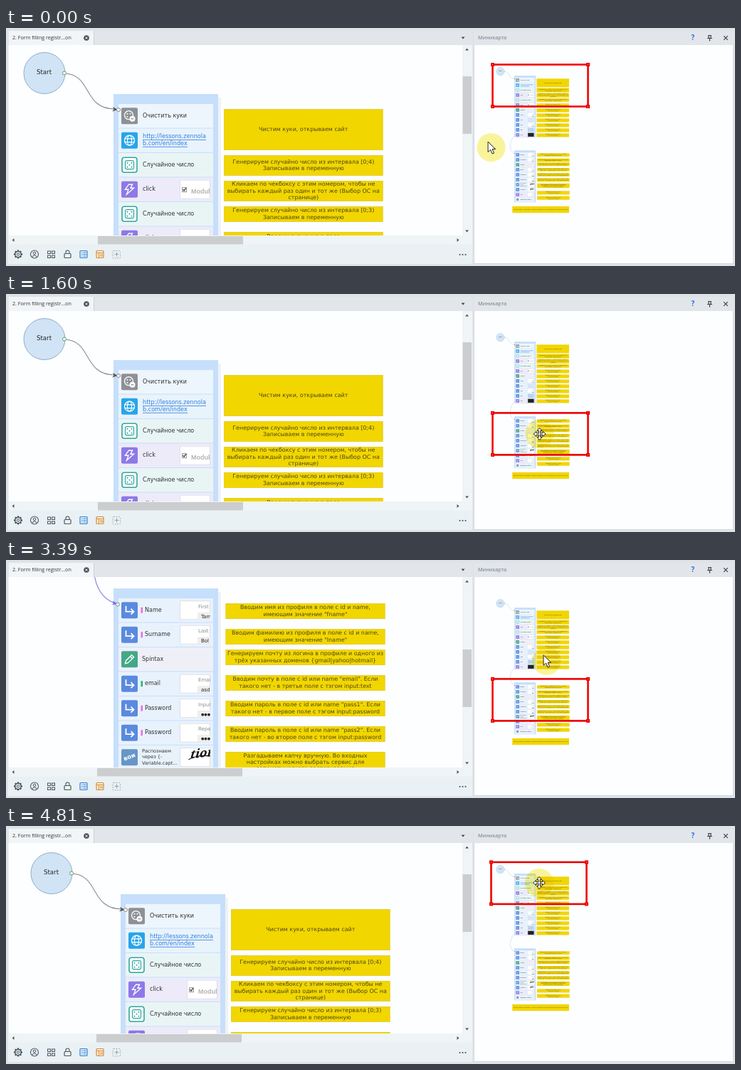
An HTML page with a canvas that plays this animation: 1024 px wide and 335 px high, repeating every 6660 ms.

```html
<!DOCTYPE html>
<html lang="ru">
<head>
<meta charset="utf-8">
<title>Миникарта</title>
<style>
html, body { margin: 0; width: 100%; height: 100%; overflow: hidden; background: #dfe3e8; }
canvas { display: block; width: 1024px; height: 335px; }
</style>
</head>
<body>
<canvas id="stage" width="1024" height="335"></canvas>
<script>
const g = document.getElementById('stage').getContext('2d');
const LOOP = 6660, PITCH = 34.5, MAP = 0.203;
const BODY = '"DejaVu Sans", sans-serif', UI = '"Open Sans", "Noto Sans", sans-serif';

function rect(x, y, w, h, fill, stroke) {
  if (fill) { g.fillStyle = fill; g.fillRect(x, y, w, h); }
  if (stroke) { g.strokeStyle = stroke; g.lineWidth = 1; g.strokeRect(x + .5, y + .5, w - 1, h - 1); }
}
function round(x, y, w, h, r, fill, stroke, lw = 1) {
  g.beginPath(); g.roundRect(x, y, w, h, r); paint(fill, stroke, lw);
}
function disc(x, y, r, fill, stroke, lw = 1) {
  g.beginPath(); g.arc(x, y, r, 0, 7); paint(fill, stroke, lw);
}
function shape(d, fill, stroke, lw = 1) {
  const p = new Path2D(d);
  if (fill) { g.fillStyle = fill; g.fill(p); }
  if (stroke) { g.strokeStyle = stroke; g.lineWidth = lw; g.stroke(p); }
}
function paint(fill, stroke, lw) {
  if (fill) { g.fillStyle = fill; g.fill(); }
  if (stroke) { g.strokeStyle = stroke; g.lineWidth = lw; g.stroke(); }
}
function text(s, x, y, size, color, align = 'left', font = BODY, weight = '') {
  g.font = `${weight} ${size}px ${font}`;
  g.fillStyle = color; g.textAlign = align; g.textBaseline = 'middle';
  g.fillText(s, x, y);
}
function at(x, y, draw, k = 1) {
  g.save(); g.translate(x, y); g.scale(k, k); draw(); g.restore();
}
function clipped(x, y, w, h, draw) {
  g.save(); g.beginPath(); g.rect(x, y, w, h); g.clip(); draw(); g.restore();
}

// Row kinds: icon colour, row background, glyph centred on 0,0.
const KINDS = {
  cookie: ['#8d9196', '#edf5fd', () => {
    disc(-1, -1, 6, null, '#fff', 1.3);
    for (const [x, y] of [[-3, -3], [1, -3], [-3, 1]]) disc(x, y, 1, '#fff');
    disc(4, 4, 4, '#fff'); rect(2, 3.4, 4, 1.3, '#8d9196');
  }],
  globe: ['#27a5ea', '#e8f3fc', () => {
    disc(0, 0, 7, null, '#fff', 1.3);
    g.beginPath(); g.ellipse(0, 0, 3, 7, 0, 0, 7); paint(null, '#fff', 1.2);
    shape('M-7 -2.4H7M-7 2.4H7', null, '#fff', 1.2);
  }],
  dice: ['#fff', '#e9f5f5', () => {
    round(-10.5, -10.5, 21, 21, 3, '#fff', '#2fa59d', 1.6);
    round(-6, -6, 12, 12, 2, null, '#2fa59d', 1.2);
    for (const [x, y] of [[-3, -3], [3, -3], [0, 0], [-3, 3], [3, 3]]) disc(x, y, 1, '#2fa59d');
  }],
  click: ['#8d79e7', '#edebf9', () => shape('M-1 -7H4L1.500 -2H6L-4 7L-1.500 0H-6Z', null, '#fff', 1.4)],
  input: ['#5a8ade', '#e8f2fd', () => shape('M-5 -6V2H5M2 -2L6 2L2 6', null, '#fff', 1.8)],
  pen: ['#43a887', '#efeff8', () => shape('M-6 6L-5 2L3 -6L6 -3L-2 5ZM1 -4L4 -1', null, '#fff', 1.4)],
  captcha: ['#6696c6', '#e8f2fb', () => {
    g.rotate(-.35); text('вои', 0, 0, 8.500, '#fff', 'center', BODY, 'bold');
  }],
  gear: ['#e9f1fb', '#e8f2fd', () => { disc(0, 0, 7, '#4c6d95'); disc(0, 0, 3, '#e9f1fb'); }]
};

const FIELD = (a, b) => ({ a, b });
const ROWS1 = [
  ['cookie', 'Очистить куки'], ['globe', ''], ['dice', 'Случайное число'],
  ['click', 'click', { check: 1 }], ['dice', 'Случайное число'], ['click', 'click', { check: 1 }],
  ['pen', 'Spintax'], ['input', 'Login', FIELD('Login', 'abc')], ['input', 'Text', { tint: '#d5e6f8' }],
  ['input', 'Text', FIELD('Text', 'abc')], ['input', 'Text', { tint: '#b9d3ee' }],
  ['click', 'click', { tint: '#222' }]
];
const PINK = '#f169dc', GREEN = '#1fb876';
const ROWS2 = [
  ['input', 'Name', FIELD('First', 'Tam'), PINK], ['input', 'Surname', FIELD('Last', 'Bol'), PINK],
  ['pen', 'Spintax'], ['input', 'email', FIELD('Emai', 'asd'), GREEN],
  ['input', 'Password', FIELD('Input', '●●●'), PINK], ['input', 'Password', FIELD('Repe', '●●●'), PINK],
  ['captcha', 'Распознаем|через {-|Variable.capt...', { word: 'tion' }],
  ['input', 'Captcha', { word: 'ow' }, PINK], ['click', 'click', FIELD('Send', '')],
  ['gear', 'Завершить работу']
];
const MORE = 'Вводим значение в поле|с нужным номером';
// y, height, lines
const NOTES1 = [
  [114, 58, 'Чистим куки, открываем сайт'],
  [179, 29, 'Генерируем случайно число из интервала [0;4)|Записываем в переменную'],
  [215, 29, 'Кликаем по чекбоксу с этим номером, чтобы не|выбирать каждый раз один и тот же (Выбор ОС на|странице)'],
  [251, 22, 'Генерируем случайно число из интервала [0;3)|Записываем в переменную']
];
for (let i = 0; i < 7; i++) NOTES1.push([287 + i * PITCH, 24, MORE]);
const NOTES2 = [
  [61, 22, 'Вводим имя из профиля в поле с id и name,|имеющим значение "fname"'],
  [97, 22, 'Вводим фамилию из профиля в поле с id и name,|имеющим значение "lname"'],
  [126, 22, 'Генерируем почту из логина в профиле и одного из|трёх указанных доменов {gmail|yahoo|hotmail}'],
  [162, 22, 'Вводим почту в поле с id или name "email". Если|такого нет - в третье поле с тэгом input:text'],
  [198, 22, 'Вводим пароль в поле с id или name "pass1". Если|такого нет - в первое поле с тэгом input:password'],
  [234, 22, 'Вводим пароль в поле с id или name "pass2". Если|такого нет - во второе поле с тэгом input:password'],
  [270, 30, 'Разгадываем капчу вручную. Во входных|настройках можно выбрать сервис для|автоматического распознавания'],
  [322, 24, MORE], [358, 24, MORE]
];

function note(x, y, w, h, s) {
  rect(x, y, w, h, '#f2d600', '#e6cf2c');
  const lines = s.split(/\|(?!yahoo|hotmail)/);
  lines.forEach((l, i) =>
    text(l, x + w / 2, y + h / 2 + (i - (lines.length - 1) / 2) * 9.3, 7.95, '#4a4718', 'center'));
}

function thumb(c, f) {
  rect(244, c - 13.500, 43, 27, f.tint || '#fff', '#dcdfe6');
  clipped(245, c - 13, 42, 26, () => {
    if (f.check) {
      rect(247, c - 3, 7, 7, '#f4f4f4', '#999');
      shape(`M248.500 ${c}l1.500 2l3 -4`, null, '#444', 1.2);
      text('Modul', 260, c + 3, 9, '#b3b3b3', 'left', '"Liberation Sans", sans-serif', 'bold');
    } else if (f.word) {
      at(259, c - 3, () => {
        g.transform(1, -.12, -.1, 1, 0, 0);
        text(f.word, 0, 0, 17, '#111', 'left', '"Noto Serif", serif', 'italic bold');
        shape('M-2 6Q10 0 30 5', null, '#111', 1.3);
      });
    } else if (f.a) {
      text(f.a, 270, c - 5, 7, '#8a8a8a');
      rect(269, c + 3, 18, 11, '#eeeeef');
      text(f.b, 274, c + 9, f.b[0] === '●' ? 5 : 7, '#222');
    }
  });
}

function block(y, rows) {
  const h = 14 + rows.length * PITCH;
  rect(156, y + 5, 146, h - 2, '#f0f2f6');
  rect(151, y, 147, h, '#c6dffb');
  rows.forEach(([kind, label, field, tag], i) => {
    const top = y + 14 + i * PITCH, c = top + 16.7;
    const [color, bg, glyph] = KINDS[kind];
    rect(158, top, 133, PITCH - 1, bg);
    round(162, c - 11.500, 23, 23, 2, color);
    at(173.500, c, glyph);
    if (kind === 'globe') {
      ['http://lessons.zennola', 'b.com/en/index'].forEach((s, k) => {
        const ly = c - 5 + k * 9.7;
        text(s, 192, ly, 8.1, '#2f7edc');
        rect(192, ly + 4, k ? 63 : 89, .8, '#2f7edc');
      });
    } else if (label.includes('|')) {
      label.split('|').forEach((s, k) => text(s, 191, c - 8.500 + k * 8.500, 6.6, '#333'));
    } else {
      if (tag) rect(189.500, c - 4, 2.500, 8, tag);
      text(label, tag ? 195 : y > 500 ? 191 : 192, c, 8, '#333');
    }
    if (field) thumb(c, field);
  });
}

function port(x, y, color) { disc(x, y, 2.500, '#fff', color, 1); }

// The whole diagram; the minimap is the same drawing at a smaller scale.
function scene() {
  block(93, ROWS1);
  block(611, ROWS2);
  for (const [y, h, s] of NOTES1) note(306, y, 223.500, h, s);
  for (const [y, h, s] of NOTES2) note(308.500, y + 571, 224, h, s);
  note(137, 999, 393, 45, 'Данный шаблон показывает основные приёмы заполнения формы регистрации на сайте');

  disc(54, 63.500, 29, '#d0e4f5', '#8faccb');
  text('Start', 53.500, 63, 8.600, '#222', 'center');
  shape('M83 64C121 66 108 114 153 114', null, '#8b8b8b', 1.1);
  shape('M157 115L150 111L151.500 114.500L149 117.500Z', '#555');
  port(82, 63.500, '#5aa05a');
  port(158, 115, '#888');

  shape('M157 505C120 530 105 620 157 633', null, '#8b78e6', 1.1);
  shape('M157 633L150 628.500L151 632L148.500 634Z', '#7a67d8');
  port(157, 633.500, '#888');
}

function cross(x, y, r, color, lw) {
  shape(`M${x - r} ${y - r}L${x + r} ${y + r}M${x + r} ${y - r}L${x - r} ${y + r}`, null, color, lw);
}

function toolbar() {
  const y = 318.500, ink = '#4b565f';
  for (let i = 0; i < 8; i++) at(17, y, () => { g.rotate(i * Math.PI / 4); rect(-1.2, -6, 2.4, 2.500, ink); });
  disc(17, y, 4.2, null, ink, 1.2); disc(17, y, 1.7, null, ink);
  disc(40, y, 5.500, null, ink, 1.1); disc(40, y - 1.500, 1.8, null, ink);
  shape(`M36.500 ${y + 4}Q40 ${y - 1} 43.500 ${y + 4}`, null, ink, 1.1);
  for (const dx of [-5, 1]) for (const dy of [-5, 1]) rect(63 + dx, y + dy, 5, 4.500, null, ink);
  round(82, y - 1, 9, 6, 1, null, ink, 1.2);
  shape(`M84 ${y - 1}V${y - 3}A2.500 2.500 0 0 1 89 ${y - 3}V${y - 1}`, null, ink, 1.1);
  round(104, y - 5, 10, 10, 1, null, '#2b83da', 1.2);
  for (const d of [-2.500, 0, 2.500]) shape(`M106 ${y + d}h1.500M108.500 ${y + d}h4`, null, '#2b83da', 1);
  round(127, y - 5, 10, 10, 1, null, '#df8a26', 1.2);
  shape(`M127 ${y - 2}h10M130.500 ${y - 2}v7M132 ${y + .5}h4M132 ${y + 2.500}h4`, null, '#df8a26', 1);
  g.setLineDash([2, 1.500]); round(150, y - 5, 10.500, 10.500, 1, null, '#a9b1b8', 1); g.setLineDash([]);
  shape(`M152.500 ${y}h6M155.500 ${y - 3}v6`, null, '#9aa3aa', 1.1);
  for (const x of [637.500, 641.500, 645.500]) disc(x, y + .5, 1.1, ink);
}

function leftPanel(sx, sy) {
  rect(3, 4, 652, 20, '#e2e6eb');
  rect(4, 4, 120, 20, '#f2f5f7');
  rect(123, 4, 1, 20, '#ccd2d8');
  text('2. Form filling registr...on', 9, 14, 7.150, '#333', 'left', UI);
  disc(113, 14, 3.800, '#4c5258'); cross(113, 14, 1.500, '#fff', 1);
  shape('M639.500 12.500h5l-2.500 3z', '#444');
  rect(3, 24, 652, 308, '#eaf1f4');
  rect(4, 24, 637, 268, '#fdfeff');
  clipped(4, 24, 637, 268, () => at(-sx, -sy, scene));

  rect(641, 24, 14, 268, '#eff4f6');
  rect(4, 292, 651, 13, '#eff4f6');
  rect(641.500, 68 + Math.max(0, sy) * 58 / 571, 12.500, 81, '#cbcdcf');
  rect(129 + (sx < 0 ? sx / 5 : -sy / 571), 293, 204, 11.500, '#cbcdcf');
  const ink = '#50565b';
  shape('M645 31.500h5l-2.500 -3zM645 284.500h5l-2.500 3zM11.500 296v5l-3 -2.500zM633.500 296v5l3 -2.500z', ink);
  toolbar();
}

function rightPanel(vx, vy) {
  rect(657, 4, 365, 20, '#e2e6eb');
  text('Миникарта', 663, 14, 7.3, '#70787f', 'left', UI);
  text('?', 965, 14, 10, '#2f6fe0', 'center', UI, 'bold');
  shape('M986 10.500h5M987 10.500v4M990 10.500v4M985 14.500h7M988.500 15v3.500', null, '#3c4247', 1.2);
  cross(1011, 14, 2.800, '#3c4247', 1.2);
  rect(657, 24, 365, 308, '#d6dbe0');
  rect(658, 24, 363, 307, '#fdfeff');
  clipped(658, 24, 363, 307, () => at(683.4, 48.200, scene, MAP));

  const x = 683.500 + vx * MAP, y = 51.500 + vy * MAP, w = 134, h = 59;
  g.strokeStyle = '#ee0000'; g.lineWidth = 2.600; g.strokeRect(x, y, w, h);
  for (const cx of [x, x + w]) for (const cy of [y, y + h]) {
    rect(cx - 2.500, cy - 2.500, 5, 5, '#ee0000');
    rect(cx - .5, cy - .5, 1, 1, '#ff9d9d');
  }
}

// Pointer hot spot: time, x, y
const PATH = [
  [0, 677, 160], [30, 678, 161], [690, 736, 189], [760, 737, 189.500], [890, 743, 192], [1250, 751, 197],
  [1460, 750, 196], [1600, 749.500, 197], [2860, 750, 196.500], [2980, 746, 189], [3390, 755, 134],
  [3520, 758, 113], [4210, 749, 81], [4460, 749, 80], [LOOP, 749, 80.500]
];
function hotSpot(t) {
  const i = Math.max(1, PATH.findIndex(k => k[0] > t));
  const [t0, x0, y0] = PATH[i - 1], [t1, x1, y1] = PATH[i];
  const still = (t0 >= 1250 && t1 <= 2860) || t0 >= 4210;
  const p = still ? 0 : (t - t0) / (t1 - t0);
  return [x0 + (x1 - x0) * p, y0 + (y1 - y0) * p];
}

function pointer(t) {
  const [x, y] = hotSpot(t);
  const move = (t >= 1600 && t < 3390 && y > 167) || t >= 4740;
  g.globalCompositeOperation = 'multiply';
  disc(move ? x : x + 4.500, move ? y : y + 8, 20, 'rgba(247,236,70,.55)');
  g.globalCompositeOperation = 'source-over';
  at(x, y, () => {
    if (!move) return shape('M0 0V14.500L3.500 11.300L6 17L8.500 16L6 10.500H10.500Z', '#fff', '#222', 1);
    for (let i = 0; i < 4; i++) {
      g.rotate(Math.PI / 2);
      shape('M-1.200 0V-4.500H-3.500L0 -8.500L3.500 -4.500H1.200V0', '#fff', '#222', 1);
    }
    rect(-1, -1, 2, 2, '#fff');
  });
}

const HOME = [0, 0], LOWER = [0, 571], BACK = [-10, -3];
const view = (t, down, up) => t < down ? HOME : t < up ? LOWER : BACK;

function draw(t) {
  rect(0, 0, 1024, 335, '#dfe3e8');
  leftPanel(...view(t, 1660, 4810));
  rightPanel(...view(t, 1600, 4740));
  pointer(t);
}

const start = performance.now();
function tick() {
  draw((performance.now() - start) % LOOP);
  requestAnimationFrame(tick);
}
tick();
</script>
</body>
</html>
```
